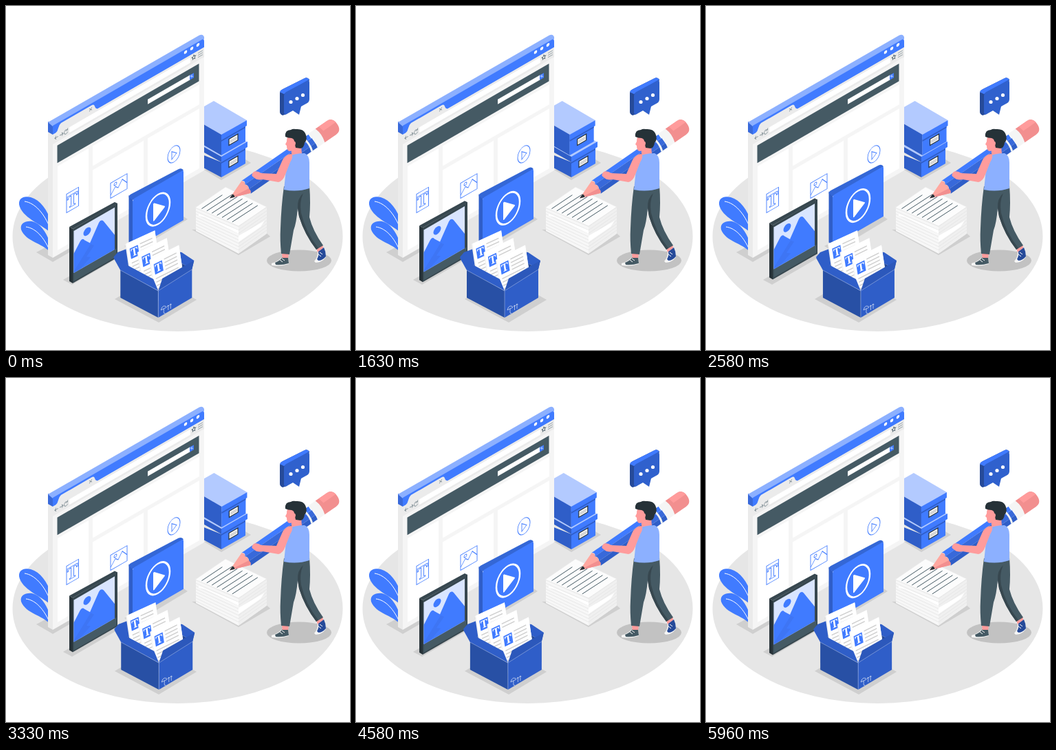
An HTML page that plays this animation: 500x500 px, repeating every 6 s.

```html
<!DOCTYPE html>
<html lang="en">
<head>
<meta charset="utf-8">
<style>
html, body { margin: 0; width: 100%; height: 100%; overflow: hidden; background: #fff; }
svg { display: block; width: 100vw; height: 100vh; }
text { font-family: "Noto Serif", serif; text-anchor: middle; }
.blue { fill: #407bff; } .mid { fill: #3869da; } .deep { fill: #2f5ec8; } .navy { fill: #264a99; }
.pale { fill: #b3caff; } .dark { fill: #37474f; } .slate { fill: #455a64; } .white { fill: #fff; }
.shade { fill: #cfcfcf; } .skin { fill: #ff9c9c; } .ink { fill: #263238; }
.line { fill: none; stroke: #407bff; } .wire { fill: none; stroke: #fff; }
</style>
</head>
<body>
<svg viewBox="0 0 500 500">
  <defs>
    <g id="label">
      <path class="white" stroke="#263238" stroke-width="1.200" d="M324 193.500l13-7.500v9l-13 7.500z"/>
      <path fill="#d5d5d5" d="M325.500 195l10-5.700v4.700l-10 5.700z"/>
    </g>
    <g id="sheet">
      <path fill="#f4f4f4" d="M0 0H43V62H0z"/>
      <path class="white" d="M1.500 0H43V60H1.500z"/>
      <path class="blue" d="M5 9H17V24H5z"/>
      <text class="white" x="11" y="21.500" font-size="15" font-weight="bold">T</text>
      <path fill="none" stroke="#cfcfcf" stroke-width="1.500" d="M20 9H38M20 14H38M20 19H38M20 24H38M5 30H38M5 35H38M5 40H38M5 45H38M5 50H38"/>
    </g>
  </defs>

  <ellipse cx="249.500" cy="335" rx="240" ry="138" fill="#e6e6e6"/>
  <g class="shade">
    <ellipse cx="426" cy="370" rx="47" ry="15.500" fill="#c2c2c2"/>
    <path d="M44 358l17-9 40 4-33 19z"/>
    <path d="M288 238l25 15 43-25-8-5z"/>
    <path d="M270 325l68 37 46-27-10-9z"/>
  </g>

  <!-- leaves -->
  <g class="blue">
    <path d="M66 331C54 318 27 310 20 292C16 280 25 275 36 278C50 282 60 296 66 315z"/>
    <path d="M63 357C54 345 29 343 22 325C20 316 28 312 38 313C50 316 58 328 63 342z"/>
    <path class="wire" d="M27 284C42 286 56 302 64 323M29 321C44 323 55 337 63 354"/>
  </g>

  <!-- storage boxes -->
  <path class="pale" d="M265 192l48 27 38-21-38-22z"/>
  <path class="deep" d="M270 210l43 17v22l-43-23z"/>
  <path class="blue" d="M313 226l35-20v23l-35 20z"/>
  <path class="deep" d="M265 192l48 27v8l-48-27z"/>
  <path class="blue" d="M313 219l38-22v8l-38 22z"/>
  <path class="deep" d="M313 227l35-20v2l-35 20z"/>
  <use href="#label" y="32"/>
  <g id="crate">
    <path class="deep" d="M270 168l43 26v23l-43-25z"/>
    <path class="blue" d="M313 194l35-20v23l-35 20z"/>
    <path class="pale" d="M302 138l48 28-37 21-48-28z"/>
    <path class="deep" d="M265 159l48 28v8l-48-28z"/>
    <path class="blue" d="M313 187l37-21v8l-37 21z"/>
    <path class="deep" d="M313 195l35-20v2l-35 20z"/>
    <use href="#label"/>
  </g>

  <!-- browser window -->
  <path fill="#ebebeb" d="M61 181l7 5v180l-7-4z"/>
  <path class="mid" d="M61 168l7 4v15l-7-4z"/>
  <path fill="#8cb0ff" d="M61 169L281 42.500Q286 40 288 45V48L68 175z"/>
  <g transform="translate(68 187) skewY(-30)">
    <path fill="#f5f5f5" d="M0 0H220V179H0z"/>
    <path class="blue" d="M0-13H217Q220-13 220-9V0H0z"/>
    <path fill="#ebebeb" d="M4 0Q7-1 8-5T12-10H57Q60-10 61-6T65 0zM0 0H220V14H0z"/>
    <path class="white" d="M24 3H200V11H24z"/>
    <path fill="none" stroke="#7b8a91" stroke-width=".8" d="M53-7l4 4m0-4l-4 4M8 7H3l2-2.500M3 7l2 2.500M10 7h5l-2-2.500M15 7l-2 2.500M21 5a2.500 3 0 1 0 .5 3M21.500 3v2.500h-2.500M211 3.500h7M211 6.500h7M211 9.500h7"/>
    <path fill="none" stroke="#455a64" stroke-width=".8" d="M205 2.500l.8 2 2 .3-1.500 1.500.4 2.200-1.700-1-1.700 1 .4-2.200-1.500-1.500 2-.3z"/>
    <g class="white">
      <circle cx="193" cy="-8.600" r="2.300"/><circle cx="202" cy="-8.600" r="2.300"/><circle cx="211" cy="-8.600" r="2.300"/>
      <path d="M7 50H52V172H7zM58 50H213V79H58zM58 85H132V172H58zM138 85H213V172H138z"/>
    </g>
    <path class="slate" d="M6.500 19.500H212.500V45H6.500z"/>
    <path class="white" d="M138 28.500H200V35.500H138z"/>
    <path class="blue" d="M199 28.500H205V35.500H199z"/>
    <path class="wire" stroke-width=".6" d="M203 31a1.200 1.200 0 1 0-.2 1l1 1.500"/>
    <g class="line" stroke-width=".9">
      <path d="M20 98H37.500V125H20z"/>
      <text x="28.700" y="120" font-size="24" font-weight="bold">T</text>
      <path d="M84 119H108V141H84zM84 137l7-9 4 4 6-9 7 9"/>
      <circle cx="91" cy="124" r="2"/>
      <ellipse cx="176" cy="130" rx="9" ry="11.500"/>
      <path d="M173 124.500V136l7-5.500z"/>
    </g>
  </g>

  <!-- paper stack -->
  <path fill="#f7f7f7" d="M276 294l62 27v39l-62-33z"/>
  <path fill="#f0f0f0" d="M338 321l41-28v38l-41 29z"/>
  <g id="layers" fill="none" stroke="#e3e3e3" stroke-width=".7"></g>
  <path class="white" d="M280 305l10 2 48 24v-5l-58-24zM338 343l32-22 6-9-38 22z"/>
  <path fill="#fcfcfc" stroke="#e6e6e6" stroke-width=".6" d="M275 293l44-30 60 29-41 28z"/>
  <g id="writing" stroke="#455a64"></g>

  <!-- pencil -->
  <g transform="translate(325 279.500) rotate(-34.700)">
    <path fill="#ffa8a0" d="M0 0L29-11Q33-6 30-3Q34 0 31 4Q34 8 29 11z"/>
    <path fill="#f28f8f" d="M0 0L31 4Q34 8 29 11z"/>
    <path class="ink" d="M0 0L7-2.600Q9 0 7 2.600z"/>
    <path class="blue" d="M29-11H147V-4H30Q34-8 29-11z"/>
    <path class="mid" d="M30-4H148V5H31Q34 0 30-4z"/>
    <path class="deep" d="M31 5H148V12H29Q33 8 31 5z"/>
    <path fill="#f5f5f5" d="M136-11.500H139Q143 0 139 12H136Q140 0 136-11.500zM147-12H161Q165 0 161 12H147Q151 0 147-12z"/>
    <path fill="#f28f8f" d="M160-12H180Q190-12 190 0T180 12H160Q164 0 160-12z"/>
    <path class="skin" d="M166-12H180Q188-12 190-3H168z"/>
  </g>

  <!-- man -->
  <path class="skin" d="M401 358h10l-1 10-8 2zM451 352l9-5 2 8-8 6z"/>
  <path fill="#f5f5f5" d="M386 374q8-2 14-8h10l1 9q-12 4-25 2zM448 371q5-5 5-13l9-7q3 6 3 14-6 8-15 8z"/>
  <path class="slate" d="M391 373q6-2 10-7h9l1 8q-10 3-19 2z"/>
  <path class="navy" d="M452 368q3-5 2-11l8-6q3 6 3 13-5 6-11 6z"/>
  <path class="wire" d="M398 369l4 3M401 367l4 3M454 361l4 3M456 358l4 3"/>
  <path class="slate" d="M404 262l37-1q2 26 0 46 5 20 20 41l-10 6q-17-22-25-48l-2-12q-2 22-6 32l-6 35-12-1q-2-20-1-37 1-32 5-61z"/>
  <path class="dark" d="M424 294q-1-14 8-22-6 13-3 29 6 27 25 51l-3 2q-17-22-25-48z"/>
  <path class="skin" d="M415 203l14-1 1 14-15 3z"/>
  <path fill="#8cb0ff" d="M410 219q10-5 24-5 7 3 7 14v37q-18 6-37 2 2-25 6-48z"/>
  <path class="skin" d="M414 215q-9 1-13 11l-8 18-22-1q-6-4-11-2-5 5 0 8 5 5 13 3l23 4q7-2 10-11l7-18q6-10 1-12z"/>
  <path class="skin" d="M409 190q-1 4-1 7l-2 4 2 2q0 7 4 8 9 0 11-7v-14z"/>
  <path class="ink" d="M406 190q-1-10 8-10 3-2 7-1 11-1 14 6 4 8-1 14-1 7-6 8l-7-1-2-9q0-4-4-5-5 0-9-2z"/>
  <path class="skin" d="M416 197q5-2 5 3-1 5-5 3z"/>

  <!-- speech bubble -->
  <path class="navy" d="M398 127q0-4 4-6l32-16q4-2 7 2l-5 15-28 35-6 2q-4-2-4-5z"/>
  <path class="blue" d="M398 125q1-3 4-4l32-16q4-2 7 2l-37 21z"/>
  <path fill="#3061cd" d="M404 130q0-3 3-5l30-16q4-2 4 2v24q0 4-3 6l-9 5-3 12-9-6-9 5q-4 2-4-2z"/>
  <g class="white"><circle cx="414" cy="139.500" r="2.600"/><circle cx="423" cy="134.500" r="2.600"/><circle cx="431.500" cy="129.500" r="2.600"/></g>

  <!-- floating cards -->
  <g class="shade">
    <path d="M172 349l83-45 9 6-78 47z"/>
    <path d="M83 398l72-41 13 6-72 42z"/>
    <path d="M158 426l64 34 55-33-62-35z"/>
  </g>
  <g id="video">
    <path class="deep" d="M178.500 275l5.500 4v75l-5.500-5z"/>
    <path fill="#3467d6" d="M178.500 278q0-3 4-5L251 237q5-2 7 2L184 282z"/>
    <g transform="translate(184 281) skewY(-30)">
      <path class="blue" d="M3 0H71Q74 0 74 3V73H0V3Q0 0 3 0z"/>
      <ellipse class="wire" cx="37" cy="36" rx="17" ry="21.500" stroke-width="2.500"/>
      <path class="white" stroke="#fff" stroke-width="2" stroke-linejoin="round" d="M31 24.500V48.500L46 37.500z"/>
    </g>
  </g>
  <g id="photo">
    <path class="ink" d="M92 321l5 3v79l-5-3z"/>
    <path class="dark" d="M92 321l66-36 4 2-65 37z"/>
    <g transform="translate(97 324) skewY(-30)">
      <path class="dark" d="M0 0H65V79H0z"/>
      <path class="slate" d="M1.500 65H63.500V77H1.500z"/>
      <path fill="#d9e5ff" d="M1.500 4H61V65H1.500z"/>
      <circle class="blue" cx="21" cy="16" r="5.500"/>
      <path class="blue" d="M1.500 37L11 24Q14 21 17 26L25 35 38 13Q41 9 45 15L61 44V65H1.500z"/>
      <path class="mid" d="M1.500 63L26 37 31 42 20 52 26 56 10 65H1.500z" opacity=".3"/>
    </g>
  </g>

  <!-- box with documents -->
  <g id="carton">
    <path class="navy" d="M167 383l49-30 55 29-49 32z"/>
    <path class="deep" d="M167 383l-10-18 6-7 53-20v15z"/>
    <path class="deep" d="M271 382l3-12-18-12-40-5z"/>
    <use href="#sheet" transform="matrix(1 -.46 .15 1 174 346)"/>
    <use href="#sheet" transform="matrix(1 -.48 .15 1 191.500 358)"/>
    <use href="#sheet" transform="matrix(1 -.5 .15 1 209 369)"/>
    <path fill="#2850a5" d="M167 383l55 31v39l-55-29z"/>
    <path class="deep" d="M222 413l49-31v42l-49 29z"/>
    <path class="deep" d="M167 384l-10-18 58 31 7 17z"/>
    <path fill="#2c58bb" d="M222 414l6-18 46-26-3 13z"/>
    <path class="wire" stroke-width=".6" opacity=".55" d="M222 414V453M167 384l55 30 49-31"/>
    <path class="wire" stroke-width=".7" opacity=".85" d="M226 442q1-5 4-6 4 0 4 2zM230 440v6q1 2 2 0M236.500 442v-7l-1.500 2m1.500-2l1.500 1M240 440v-7l-1.500 2m1.500-2l1.500 1"/>
  </g>
</svg>
<script>
const $ = id => document.getElementById(id);
const path = d => `<path d="${d}"/>`;

for (let i = 1; i < 8; i++) {
  $('layers').innerHTML += path(`M276 ${294 + i * 4.3}L338 ${321 + i * 4.8}L379 ${293 + i * 4.7}`);
  $('writing').innerHTML += path(`M${277 + i * 7.4} ${291.500 + i * 3.2}l${i < 2 ? 30 : 37}-${i < 2 ? 20 : 24}`);
}

// Shake: one stop every tenth of the loop.
const stops = [0, -1, 2, -4, 4, -4, 4, -4, 2, -1, 0];
const LOOP = 6000, FLOAT = 1500;
const move = (id, x, y) => $(id).setAttribute('transform', `translate(${x} ${y})`);

function draw(now) {
  const t = now % LOOP;
  const pos = t / LOOP * 10, i = Math.floor(pos);
  const shake = stops[i] + (stops[i + 1] - stops[i]) * (pos - i);
  const half = t % FLOAT / FLOAT * 2;
  const lift = -10 * (half < 1 ? half : 2 - half);
  move('crate', shake, 0);
  move('carton', shake * 2.3 - .7, 0);
  move('video', 0, lift);
  move('photo', 0, lift);
}

const start = performance.now();
(function tick() {
  draw(performance.now() - start);
  requestAnimationFrame(tick);
})();
</script>
</body>
</html>
```
